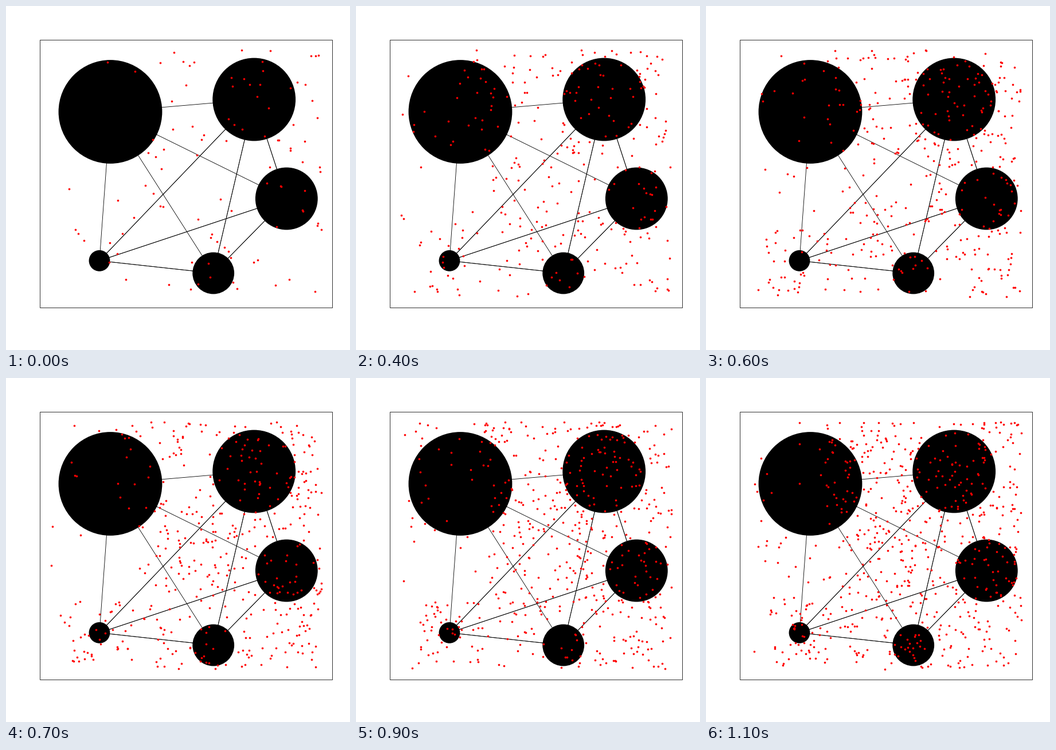
Animation of 600x600 px, one loop 1200 ms. Source, as a matplotlib script:

```python
import numpy as np
import matplotlib.pyplot as plt
from matplotlib.animation import FuncAnimation
from matplotlib.patches import Circle, Rectangle
from itertools import combinations

SIZE, DPI = 600, 100
PX = 72 / DPI  # points per pixel
FRAMES, INTERVAL = 12, 100
LEFT, RIGHT, TOP, BOTTOM = 78.5, 550.5, 76.5, 508.5  # reach of the dots

# Node centres, from the largest to the smallest
NODES = [(182, 184.5), (432.7, 163), (489.3, 336), (361.7, 466), (163, 444.3)]

fig = plt.figure(figsize=(SIZE / DPI, SIZE / DPI), dpi=DPI, facecolor="white")
ax = fig.add_axes([0, 0, 1, 1])
ax.set(xlim=(0, SIZE), ylim=(SIZE, 0))
ax.axis("off")

ax.add_patch(Rectangle((59, 59), 510, 467, fill=False, ec="black",
                       lw=0.8 * PX, snap=True))

for a, b in combinations(NODES, 2):
    # links between the smaller nodes run both ways
    for _ in range(1 if a == NODES[0] else 2):
        ax.plot(*zip(a, b), color="black", lw=0.85 * PX, zorder=1)

for k, centre in enumerate(NODES):
    ax.add_patch(Circle(centre, 18 * (len(NODES) - k) + 0.4,
                        fc="black", ec="none", zorder=2))

dots, = ax.plot([], [], "o", color="red", ms=3.6 * PX, mew=0, zorder=3)


def scatter(seed, n):
    """Dots fill the right side, with a thin spread and one small cluster."""
    rng = np.random.default_rng(seed)
    kind, u, v = rng.random((3, n))
    v **= 1.1
    edge = 195 + 55 * v
    x = edge + (RIGHT - edge) * u ** 0.9
    y = TOP + (BOTTOM - TOP) * v

    x = np.where(kind < 0.27, LEFT + (RIGHT - LEFT) * u, x)
    cx, cy = NODES[-1]
    near = kind < 0.07
    x = np.where(near, cx + 110 * (u - 0.5), x)
    y = np.where(near, cy + 110 * (v - 0.5), y)
    return x, y


def update(k):
    dots.set_data(*scatter(40 + k, 100 + 50 * k))
    return dots,


anim = FuncAnimation(fig, update, frames=FRAMES, interval=INTERVAL,
                     repeat=True, repeat_delay=0, blit=False)
plt.show()
```
